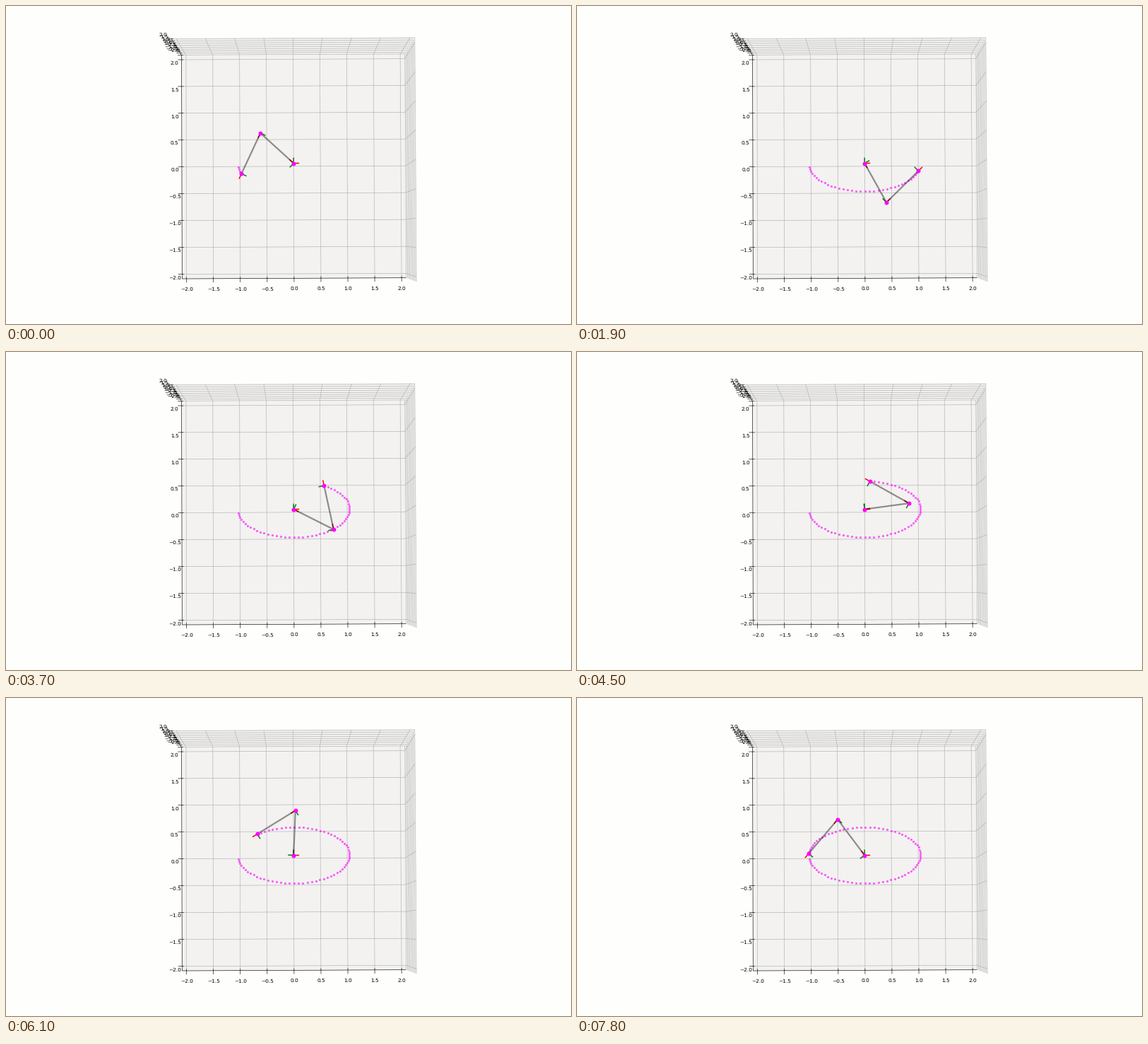
A matplotlib script that plays this animation: 800x450 px, repeating every 7.9 s.

```python
import numpy as np
import matplotlib.pyplot as plt
from matplotlib.animation import FuncAnimation
from matplotlib.collections import LineCollection

W, H, DPI = 800, 450, 100
PX = 72 / DPI                      # points per pixel
FRAMES, INTERVAL = 79, 100
plt.rcParams["font.family"] = "DejaVu Sans"
plt.rcParams["text.hinting"] = "none"

# Perspective camera looking almost straight down
ORIGIN = np.array([407.2, 222.5])
SCALE, DEPTH, Z_ASPECT = 79.35, 0.02859, 0.75
ELEV, AZIM = np.radians([87.9, -90.25])
RIGHT = np.array([-np.sin(AZIM), np.cos(AZIM), 0])
VIEW = np.array([np.cos(ELEV) * np.cos(AZIM), np.cos(ELEV) * np.sin(AZIM), np.sin(ELEV)])
UP = np.cross(VIEW, RIGHT)


def project(x, y, z=0.0):
    p = np.array([x, y, z * Z_ASPECT])
    s = SCALE / (1 - DEPTH * VIEW @ p)
    return ORIGIN + s * np.array([RIGHT @ p, -(UP @ p)])


fig = plt.figure(figsize=(W / DPI, H / DPI), dpi=DPI, facecolor="#fefefd")
ax = fig.add_axes([0, 0, 1, 1])
ax.set_xlim(0, W)
ax.set_ylim(H, 0)
ax.axis("off")


def add_lines(segments, color, width, order, alpha=None):
    lines = LineCollection(segments, colors=color, linewidths=width * PX,
                           alpha=alpha, zorder=order)
    ax.add_collection(lines, autolim=False)
    return lines


def add_dots(size, order, alpha=None):
    return ax.plot([], [], "o", color="#ff00ff", ms=size * PX, mew=0,
                   alpha=alpha, zorder=order)[0]


# Box: floor, back wall and right wall
B = 2 + 4 / 48
TICKS = np.arange(-2, 2.1, 0.5)


def pane(corners, color):
    ax.fill(*np.array([project(*c) for c in corners]).T, color=color, lw=0, zorder=0)


def path(*points):
    return [project(*p) for p in points]


pane([(-B, -B, -B), (B, -B, -B), (B, B, -B), (-B, B, -B)], "#f3f2f1")
pane([(-B, B, -B), (B, B, -B), (B, B, B), (-B, B, B)], "#f2f1f0")
pane([(B, -B, -B), (B, B, -B), (B, B, B), (B, -B, B)], "#f7f6f5")

grid = []
for t in TICKS:
    grid.append(path((t, -B, -B), (t, B, -B), (t, B, B)))
    grid.append(path((-B, t, -B), (B, t, -B), (B, t, B)))
    grid.append(path((-B, B, t), (B, B, t), (B, -B, t)))
add_lines(grid, "#b0b0b0", 0.62, 1)

axes = [path((-B, -B, -B), (B, -B, -B)),
        path((-B, -B, -B), (-B, B, -B)),
        path((-B, B, -B), (-B, B, B))]
OUT, IN = 0.2 * 2 * B / 12, 0.1 * 2 * B / 12
for t in TICKS:
    axes.append(path((t, -B - OUT, -B), (t, -B + IN, -B)))
    axes.append(path((-B - OUT, t, -B), (-B + IN, t, -B)))
    axes.append(path((-B - OUT, B, t), (-B + IN, B, t)))
add_lines(axes, "black", 0.62, 2)


def label(value, point, dx, dy):
    x, y = project(*point)
    ax.text(x + dx, y + dy, f"{value:.1f}".replace("-", "\u2212"), ha="center",
            va="baseline", fontsize=7.41 * PX, color="black", zorder=3)


for t in TICKS:
    label(t, (t, -B, -B), 0.3, 17)
    label(t, (-B, t, -B), -10, 6.8)
    label(t, (-B, B, t), -11.5, -4)

# Two-link arm whose tip follows an ellipse
LINK, AXIS = 0.8, 0.1
START, STEP = np.pi + 0.135, 0.08


def tip_at(n):
    a = START + STEP * n
    return np.array([np.cos(a), 0.5 * np.sin(a)])


def step_at(frame):
    """Steps done so far; each step takes longer than the last."""
    a, b = 0.0108, 0.2
    c = a * 9 + b * 3 + frame + 0.1
    return int((-b + np.sqrt(b * b + 4 * a * c)) / (2 * a))


def unit(angle):
    return np.array([np.cos(angle), np.sin(angle)])


trail = add_dots(3.2, 4, alpha=0.6)
reds = add_lines([], "#ff0000", 1.5, 5)
greens = add_lines([], "#008000", 1.5, 5)
links = add_lines([], "black", 2.2, 6, alpha=0.42)
joints = add_dots(6, 7)


def draw(frame):
    n = step_at(frame)
    base, tip = np.zeros(2), tip_at(n)
    reach = np.hypot(*tip)
    shoulder = np.arctan2(tip[1], tip[0]) - np.arccos(reach / (2 * LINK))
    elbow = LINK * unit(shoulder)
    fore = np.arctan2(*(tip - elbow)[::-1])

    triads = [(base, 0), (base, shoulder), (elbow, fore), (tip, fore)]
    reds.set_segments([path(p, p + AXIS * unit(a)) for p, a in
                       [(np.array(q), r) for q, r in triads]])
    greens.set_segments([path(p, p + AXIS * unit(a + np.pi / 2)) for p, a in triads])
    links.set_segments([path(base, elbow), path(elbow, tip)])
    joints.set_data(*np.array(path(base, elbow, tip)).T)
    trail.set_data(*np.array(path(*[tip_at(i) for i in range(n + 1)])).T)
    return trail, reds, greens, links, joints


anim = FuncAnimation(fig, draw, frames=FRAMES, interval=INTERVAL,
                     repeat=True, repeat_delay=0, blit=False)
plt.show()
```
